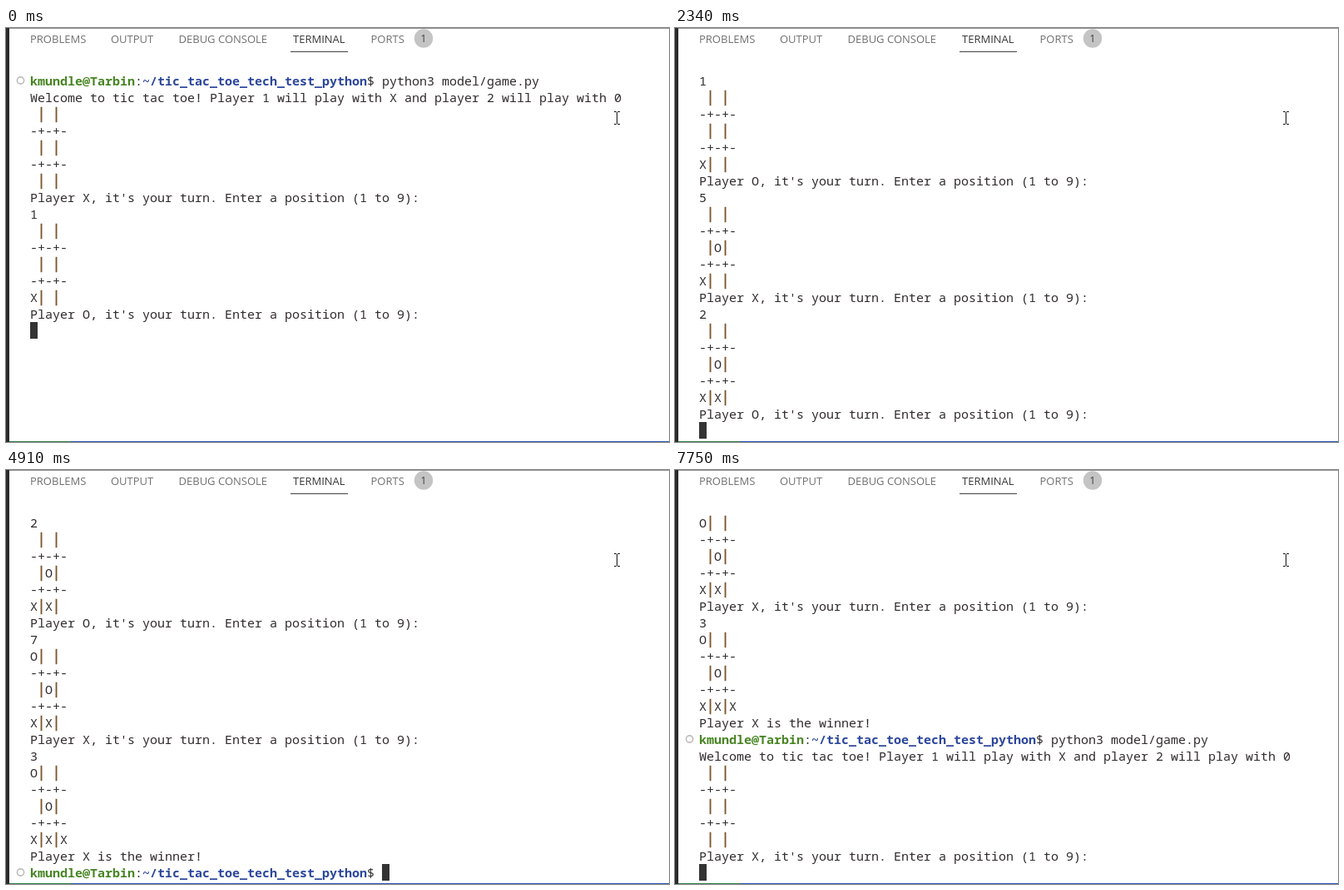
These frames come from a looping animation (797 px wide and 497 px high, 8 s). An HTML page:

```html
<!DOCTYPE html>
<html lang="en">
<head>
<meta charset="utf-8">
<title>Tic tac toe in the terminal</title>
<style>
  html, body { margin: 0; width: 100%; height: 100%; overflow: hidden; background: #fff; }
  svg { display: block; width: 797px; height: 497px; }
  text { white-space: pre; }
  .tab { font: 13px "Open Sans", "Noto Sans", sans-serif; fill: #707070; }
  .tab.on { fill: #383838; }
  .count { font: 12px "Open Sans", "Noto Sans", sans-serif; fill: #3c3c3c; text-anchor: middle; }
  #term { font: 15px "Noto Sans Mono", "DejaVu Sans Mono", monospace; fill: #302a2c; }
  .bar { font-size: 17.5px; fill: #7d552c; stroke: #7d552c; stroke-width: 0.4; text-anchor: middle; }
  .user, .path { font-weight: bold; }
  .user { fill: #478523; }
  .path { fill: #2b469c; }
</style>
</head>
<body>
<svg viewBox="0 0 797 497">
  <rect width="797" height="497" fill="#fff"/>
  <rect width="797" height="1" fill="#929292"/>
  <rect width="4" height="497" fill="#2b2b2b"/>
  <rect x="4" y="496" width="74" height="1" fill="#2f7f45"/>
  <rect x="78" y="496" width="719" height="1" fill="#2a52b4"/>

  <text class="tab" x="29" y="18">PROBLEMS</text>
  <text class="tab" x="126" y="18">OUTPUT</text>
  <text class="tab" x="207.5" y="18">DEBUG CONSOLE</text>
  <text class="tab on" x="345" y="18">TERMINAL</text>
  <text class="tab" x="438.5" y="18">PORTS</text>
  <rect x="342" y="28" width="69" height="1" fill="#424242"/>
  <circle cx="502" cy="12.5" r="11.2" fill="#c4c4c4"/>
  <text class="count" x="502" y="17">1</text>

  <g id="term"></g>
  <rect id="cursor" width="9" height="20" fill="#333"/>
  <path d="M731 100.5h2.5l1 1l1-1h2.5M734.5 101v14M731 115.5h2.5l1-1l1 1h2.5" fill="none" stroke="#111"/>
</svg>
<script>
const LOOP = 8000, LEFT = 29, TOP = 53, CHAR = 9, ROW = 20, ROWS = 22, BASE = 16;
const USER = "kmundle@Tarbin", PATH = "~/tic_tac_toe_tech_test_python";
const PROMPT_LEN = USER.length + PATH.length + 3;
const COMMAND = "python3 model/game.py";
const WELCOME = "Welcome to tic tac toe! Player 1 will play with X and player 2 will play with 0";

// Cells are numbered like a numeric keypad, 7-8-9 on top.
const cells = Array(10).fill(" ");
const board = () => [7, 4, 1]
  .map(i => cells.slice(i, i + 3).join("|"))
  .flatMap((row, i) => i ? ["-+-+-", row] : [row]);
const ask = who => `Player ${who}, it's your turn. Enter a position (1 to 9):`;

function playGame() {
  const out = [COMMAND, WELCOME, ...board()];
  [1, 5, 2, 7, 3].forEach((pos, turn) => {
    const who = "XO"[turn % 2];
    out.push(ask(who), String(pos));
    cells[pos] = who;
    out.push(...board());
  });
  return [...out, "Player X is the winner!"];
}

const lines = playGame();
const second = lines.length;
cells.fill(" ");
lines.push(COMMAND, WELCOME, ...board(), ask("X"), "");

// [time, line of the cursor, text typed on it]
const steps = [
  [0, 15, ""], [880, 15, "5"],
  [1160, 22, ""], [1960, 22, "2"],
  [2340, 29, ""], [3520, 29, "7"],
  [3790, 36, ""], [4630, 36, "3"],
  [4910, 43, ""], [6800, 43, COMMAND],
  [7610, 44, ""], [7750, 51, ""]
];

const term = document.getElementById("term");
const cursor = document.getElementById("cursor");
const hasPrompt = i => i === 0 || i === second;
const colX = col => LEFT + col * CHAR;
const put = (col, y, str, cls = "") =>
  `<text class="${cls}" x="${colX(col)}" y="${y}">${str}</text>`;

function drawLine(i, str, row) {
  const top = TOP + row * ROW, y = top + BASE;
  if (hasPrompt(i)) {
    const at = USER.length;
    return `<circle cx="17.5" cy="${top + 10}" r="4.1" fill="none" stroke="#bdbdbd" stroke-width="1.6"/>` +
      put(0, y, USER, "user") + put(at, y, ":") + put(at + 1, y, PATH, "path") +
      put(PROMPT_LEN - 2, y, "$") + put(PROMPT_LEN, y, str);
  }
  const bars = [...str].map((c, col) => c === "|" ? put(col + 0.5, y, c, "bar") : "").join("");
  return put(0, y, str.replaceAll("|", " ")) + bars;
}

let shown = null;
function render(time) {
  const step = steps.findLast(s => s[0] <= time);
  if (step === shown) return;
  shown = step;
  const [, last, typed] = step;
  const first = Math.max(0, last - ROWS + 1);
  let html = "";
  for (let i = first; i <= last; i++) {
    html += drawLine(i, i === last ? typed : lines[i], i - first);
  }
  term.innerHTML = html;
  cursor.setAttribute("x", colX((hasPrompt(last) ? PROMPT_LEN : 0) + typed.length));
  cursor.setAttribute("y", TOP + (last - first) * ROW);
}

const start = performance.now();
function tick() {
  render((performance.now() - start) % LOOP);
  requestAnimationFrame(tick);
}
tick();
</script>
</body>
</html>
```
